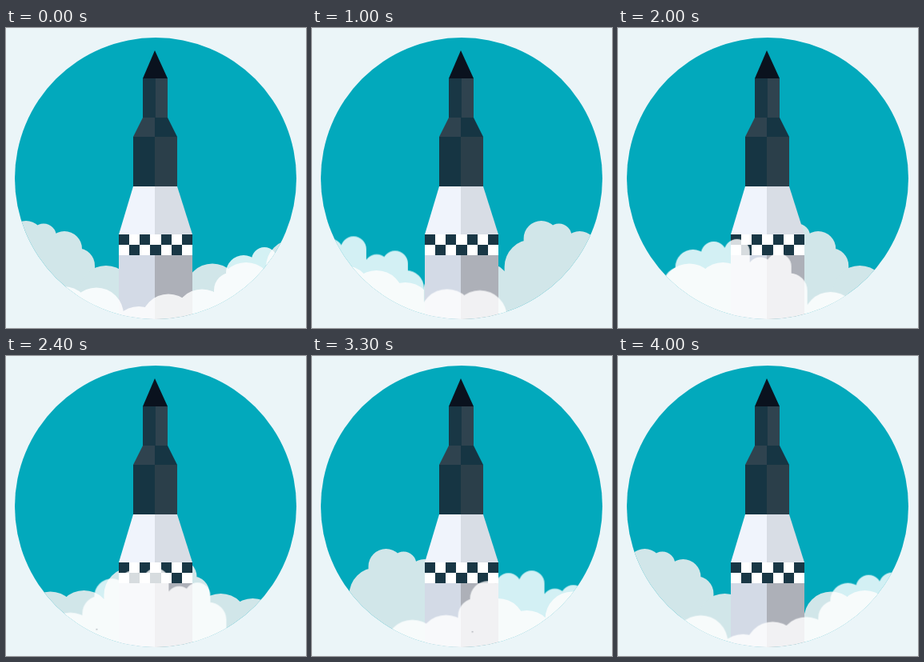
Animation of 375x375 px, one loop 4.1 s. Source, as an HTML page:

```html
<!DOCTYPE html>
<html lang="en">
<head>
<meta charset="utf-8">
<title>Rocket above the clouds</title>
<style>
  html, body { margin: 0; width: 100%; height: 100%; overflow: hidden; background: #ebf5f8; }
  svg { display: block; width: 100vw; height: 100vh; }
</style>
</head>
<body>
<svg viewBox="0 0 375 375">
  <defs>
    <clipPath id="disc"><circle cx="187" cy="188" r="176"/></clipPath>
  </defs>
  <circle cx="187" cy="188" r="176" fill="#02a9bc"/>
  <g clip-path="url(#disc)">
    <g id="back" fill="#d1e6e9"></g>
    <g id="rocket">
      <path fill="#0a121e" d="M186 28L202 63H171Z"/>
      <path fill="#193745" d="M171 63H187V112H171Z"/>
      <path fill="#2f434f" d="M187 63H202V112H187ZM171 112H186V136H159Z"/>
      <path fill="#163543" d="M186 112H202L214 136H186ZM159 136H186V198H159Z"/>
      <path fill="#2b3f4a" d="M186 136H214V198H186Z"/>
      <path fill="#f0f4fc" d="M159 198H186V258H141Z"/>
      <path fill="#d8dde5" d="M186 198H214L233 258H186Z"/>
      <path fill="#fff" d="M141 258H233V284H141Z"/>
      <path id="checks" fill="#193745"/>
      <path fill="#d3dae6" d="M141 284H186V375H141Z"/>
      <path fill="#adb0b8" d="M186 284H233V375H186Z"/>
    </g>
    <g id="front" fill="#fff" opacity=".83"></g>
  </g>
</svg>
<script>
const LOOP = 4100, STEP = 100, LEAD = 20;
const RADIUS = { small: 16, medium: 22, large: 34 };
const $ = id => document.getElementById(id);

// Each puff is the [x, y] of its crown; a cloud repeats every dx, dy.
const back = {
  dx: 346, dy: 0, dir: -1,
  large: [[125, 297], [165, 303], [201, 318], [258, 294.5], [300, 293], [359, 264.5]],
  medium: [[371, 241], [419, 254], [435, 275]],
  small: [[393, 244.5]]
};
const front = {
  dx: 397, dy: 14, dir: 1,
  large: [[72, 323], [113, 324.5], [166, 348], [203, 332.5], [245, 326.5]],
  medium: [[282, 305.5], [297, 284], [418, 313.5]],
  small: [[323, 274], [352, 271], [381, 293.5], [404, 289]],
  speck: '<circle cx="278" cy="347.5" r=".8" fill="#8b9198"/>'
};

// A round crown on a column that reaches below the stage.
const dome = (x, top, r) => `M${x - r} ${top + r}a${r} ${r} 0 0 1 ${2 * r} 0V420h${-2 * r}Z`;

function build(group, cloud) {
  let d = "";
  for (const size in RADIUS) {
    for (const [x, top] of cloud[size]) d += dome(x, top, RADIUS[size]);
  }
  const tile = `<path d="${d}"/>${cloud.speck || ""}`;
  group.innerHTML = [-2, -1, 0, 1]
    .map(k => `<g transform="translate(${k * cloud.dx} ${k * cloud.dy})">${tile}</g>`).join("");
}

function drift(group, { dx, dy, dir }, s) {
  group.setAttribute("transform", `translate(${dir * dx * s} ${dir * dy * s})`);
}

function drawChecks() {
  const edge = i => Math.round(141 + i * 92 / 7);
  let d = "";
  for (let i = 0; i < 7; i++) d += `M${edge(i)} ${258 + i % 2 * 13}H${edge(i + 1)}v13H${edge(i)}Z`;
  $("checks").setAttribute("d", d);
}

function draw(ms) {
  const s = ms % LOOP / LOOP;
  drift($("back"), back, s);
  drift($("front"), front, s);
}

let start;
function tick(now) {
  start ??= now;
  draw(Math.floor((now - start + LEAD) / STEP) * STEP);
  requestAnimationFrame(tick);
}

build($("back"), back);
build($("front"), front);
drawChecks();
draw(0);
requestAnimationFrame(tick);
</script>
</body>
</html>
```
